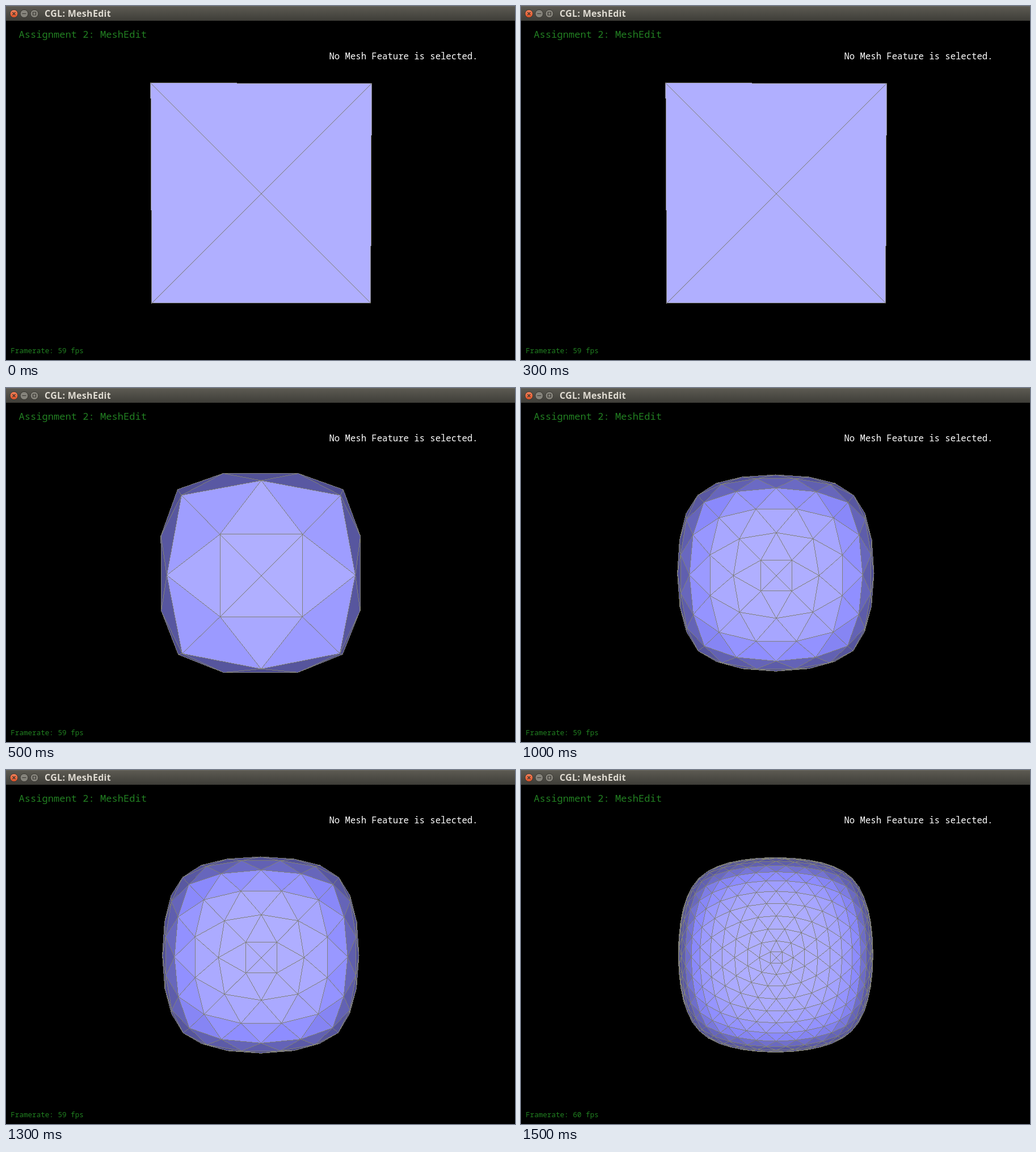
Recreate the animation shown at these times as an HTML page with a canvas. Size 897 px wide and 624 px high, loop 2 s.

```html
<!DOCTYPE html>
<html lang="en">
<head>
<meta charset="utf-8">
<title>Loop subdivision</title>
<style>
  html, body { margin: 0; width: 100%; height: 100%; overflow: hidden; background: #000; }
  canvas, svg { position: absolute; left: 0; top: 0; width: 897px; height: 624px; }
  .mono { font-family: "Noto Sans Mono", monospace; white-space: pre; }
  .title { font: bold 16px "Noto Sans", sans-serif; letter-spacing: .3px; fill: #dfdbd2; }
</style>
</head>
<body>
<canvas id="view" width="897" height="624"></canvas>
<svg viewBox="0 0 897 624">
  <defs>
    <linearGradient id="bar" x2="0" y2="1">
      <stop offset="0" stop-color="#5d5b53"/>
      <stop offset="1" stop-color="#3e3d38"/>
    </linearGradient>
    <linearGradient id="close" x2="0" y2="1">
      <stop offset="0" stop-color="#f1835c"/>
      <stop offset="1" stop-color="#dd5126"/>
    </linearGradient>
  </defs>
  <rect width="897" height="26" fill="url(#bar)"/>
  <rect width="897" height="1" fill="#6a685f"/>
  <g stroke="#35342f">
    <circle cx="14" cy="13.5" r="7" fill="url(#close)"/>
    <circle cx="32" cy="13.5" r="7" fill="#85837b"/>
    <circle cx="50" cy="13.5" r="7" fill="#85837b"/>
    <path d="M11.5 11l5 5m0-5l-5 5M28.500 13.500h7M47.500 11h5v5h-5z" fill="none" stroke-width="1.2"/>
  </g>
  <text class="title" x="68" y="19">CGL: MeshEdit</text>
  <g class="mono">
    <text x="22.500" y="56" font-size="17.100" fill="#228022">Assignment 2: MeshEdit</text>
    <text x="569.500" y="93.500" font-size="15.600" fill="#fff">No Mesh Feature is selected.</text>
    <text id="fps" x="8.300" y="612" font-size="12.600" fill="#208020"></text>
  </g>
</svg>
<script>
const ctx = document.getElementById('view').getContext('2d');
const fps = document.getElementById('fps');
const CAM = { x: 448.5, y: 324.8, focal: 1163, dist: 7, pitch: 0.0306, yaw: 0.0072 };
const EDGE = '#80807a';
const STEP = 500;

// Brightness of the red and green channels against the normal's z
const TONE = [[0, 62], [.25, 81], [.4, 88], [.55, 103], [.7, 128], [.85, 148], [.9, 158], [1, 176]];

const sub = (a, b) => a.map((v, i) => v - b[i]);
const dot = (a, b) => a[0] * b[0] + a[1] * b[1] + a[2] * b[2];
const cross = (a, b) => [
  a[1] * b[2] - a[2] * b[1],
  a[2] * b[0] - a[0] * b[2],
  a[0] * b[1] - a[1] * b[0]
];
const blend = terms => [0, 1, 2].map(i => terms.reduce((sum, [w, p]) => sum + w * p[i], 0));

// Cube whose faces are each split into four around their centre
function cube() {
  const verts = [];
  const tris = [];
  for (let i = 0; i < 8; i++) verts.push([0, 1, 2].map(k => (i >> k & 1) * 2 - 1));
  for (let axis = 0; axis < 3; axis++) {
    const u = 1 << (axis + 1) % 3;
    const v = 1 << (axis + 2) % 3;
    for (const side of [0, 1]) {
      const base = side << axis;
      const ring = [base, base + u, base + u + v, base + v];
      const mid = verts.push([0, 1, 2].map(k => k === axis ? side * 2 - 1 : 0)) - 1;
      ring.forEach((a, i) => tris.push([a, ring[(i + 1) % 4], mid]));
    }
  }
  return { verts, tris };
}

const sides = ([a, b, c]) => [[a, b, c], [b, c, a], [c, a, b]];
const edgeKey = (a, b) => Math.min(a, b) + '-' + Math.max(a, b);

// One step of Loop subdivision
function subdivide({ verts, tris }) {
  const edges = new Map();
  const near = verts.map(() => new Set());
  for (const tri of tris) {
    for (const [a, b, opposite] of sides(tri)) {
      const key = edgeKey(a, b);
      if (!edges.has(key)) edges.set(key, { a, b, wings: [] });
      edges.get(key).wings.push(opposite);
      near[a].add(b);
      near[b].add(a);
    }
  }
  const next = verts.map((p, i) => {
    const n = near[i].size;
    const w = n === 3 ? 3 / 16 : 3 / (8 * n);
    return blend([[1 - n * w, p], ...[...near[i]].map(j => [w, verts[j]])]);
  });
  for (const e of edges.values()) {
    const [c, d] = e.wings;
    e.mid = next.push(blend([
      [3 / 8, verts[e.a]], [3 / 8, verts[e.b]], [1 / 8, verts[c]], [1 / 8, verts[d]]
    ])) - 1;
  }
  const split = tris.flatMap(([a, b, c]) => {
    const [ab, bc, ca] = [[a, b], [b, c], [c, a]].map(([p, q]) => edges.get(edgeKey(p, q)).mid);
    return [[a, ab, ca], [ab, b, bc], [ca, bc, c], [ab, bc, ca]];
  });
  return { verts: next, tris: split };
}

function turn([x, y, z]) {
  const { pitch, yaw } = CAM;
  const x1 = x * Math.cos(yaw) + z * Math.sin(yaw);
  const z1 = z * Math.cos(yaw) - x * Math.sin(yaw);
  return [
    x1,
    y * Math.cos(pitch) - z1 * Math.sin(pitch),
    y * Math.sin(pitch) + z1 * Math.cos(pitch)
  ];
}

function project([x, y, z]) {
  const s = CAM.focal / (CAM.dist - z);
  return [CAM.x + s * x, CAM.y - s * y];
}

function shade(nz) {
  const z = Math.max(0, Math.min(1, nz));
  const i = Math.max(1, TONE.findIndex(([at]) => at >= z));
  const [z0, c0] = TONE[i - 1];
  const [z1, c1] = TONE[i];
  const c = c0 + (c1 - c0) * (z - z0) / (z1 - z0);
  return `rgb(${Math.round(c)},${Math.round(c - 1)},${Math.min(255, Math.round(c * 1.82))})`;
}

// Hard one-pixel line
function line(p, q) {
  const steep = Math.abs(q[1] - p[1]) > Math.abs(q[0] - p[0]);
  const m = steep ? 1 : 0;
  const [a, b] = p[m] < q[m] ? [p, q] : [q, p];
  const slope = (b[1 - m] - a[1 - m]) / (b[m] - a[m] || 1);
  for (let i = Math.floor(a[m]); i <= Math.floor(b[m]); i++) {
    const j = Math.floor(a[1 - m] + (i + .5 - a[m]) * slope);
    if (steep) ctx.fillRect(j, i, 1, 1);
    else ctx.fillRect(i, j, 1, 1);
  }
}

function drawMesh({ verts, tris }) {
  const world = verts.map(turn);
  const flat = world.map(project);
  const eye = [0, 0, CAM.dist];
  const edges = new Map();
  ctx.fillStyle = '#000';
  ctx.fillRect(0, 0, 897, 624);
  for (const tri of tris) {
    const [a, b, c] = tri.map(i => world[i]);
    let n = cross(sub(b, a), sub(c, a));
    if (dot(n, a) < 0) n = n.map(v => -v);
    if (dot(n, sub(eye, a)) <= 0) continue;
    ctx.fillStyle = shade(n[2] / Math.hypot(...n));
    ctx.beginPath();
    tri.forEach(i => ctx.lineTo(...flat[i]));
    ctx.fill();
    for (const [i, j] of sides(tri)) edges.set(edgeKey(i, j), [flat[i], flat[j]]);
  }
  ctx.fillStyle = EDGE;
  for (const [p, q] of edges.values()) line(p, q);
}

const meshes = [cube()];
while (meshes.length < 4) meshes.push(subdivide(meshes[meshes.length - 1]));

let shown = -1;
const start = performance.now();

function tick() {
  const level = Math.floor((performance.now() - start) / STEP) % meshes.length;
  if (level !== shown) {
    shown = level;
    drawMesh(meshes[level]);
    fps.textContent = `Framerate: ${level === 3 ? 60 : 59} fps`;
  }
  requestAnimationFrame(tick);
}
tick();
</script>
</body>
</html>
```
